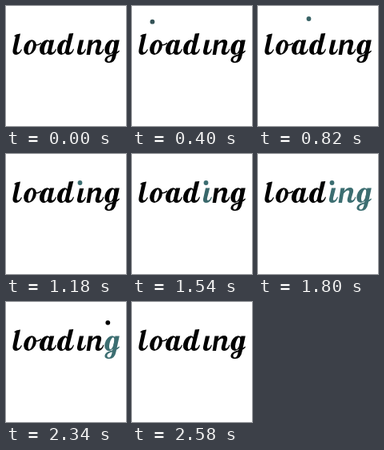
Write an HTML page that moves like this. It is 150 by 150 pixels and loops after 2640 ms.

```html
<!DOCTYPE html>
<html lang="en">
<head>
<meta charset="utf-8">
<title>loading</title>
<style>
html, body { margin: 0; width: 100%; height: 100%; overflow: hidden; background: #fff; }
svg { display: block; width: 100vw; height: 100vh; }
</style>
</head>
<body>
<svg viewBox="0 0 150 150" role="img" aria-label="loading">
  <g id="word"></g>
  <circle id="ball" r="2.9"/>
</svg>
<script>
const LOOP = 2640, STEP = 20, BASE = 61;
const BLACK = [0, 0, 0], TEAL = [60, 110, 113], SLATE = [50, 78, 82];
const NS = 'http://www.w3.org/2000/svg';
const word = document.getElementById('word');
const ball = document.getElementById('ball');

const clamp = v => Math.max(0, Math.min(1, v));
const ramp = (t, a, b) => clamp((t - a) / (b - a));
const mix = (a, b, u) => a + (b - a) * u;
const rgb = (a, b, u) => `rgb(${a.map((v, i) => Math.round(mix(v, b[i], u)))})`;

// Lettering parts, each returned as SVG markup
const shape = (d, dx = 0) => `<path d="${d}" transform="translate(${dx} 0)"/>`;
const line = (d, w) =>
  `<path d="${d}" fill="none" stroke="currentColor" stroke-width="${w}" stroke-linecap="round"/>`;
const oval = (x, y, rx, ry) =>
  `M${x - rx} ${y}a${rx} ${ry} 0 1 1 ${2 * rx} 0a${rx} ${ry} 0 1 1 ${-2 * rx} 0Z`;
const bowl = (cx, inner, rx = 7) =>
  `<path fill-rule="evenodd" transform="translate(${cx} 51.7) skewX(-13)" d="${
    oval(0, 0, rx, 9.4)}${oval(inner, 0, 2.7, 7.5)}"/>`;
const hook = dx => shape('M55 42.4H60.2L57 55Q56.4 58 58 58Q60.5 57.5 62 53.5L63 54Q61 61 56 61Q51.2 61 52 56Z', dx);

const glyphs = [
  shape('M10 37.4L13 35.4L18 34.5L13.6 54Q12.9 58 15 58Q17.5 57.5 19 54L20 54.5Q17.5 61 12.5 61Q7.4 61 8.6 54.5L12 38.6Z'),
  bowl(30, 0.8, 7.6) + line('M34 44.5Q35 49 38.5 48.8Q41.5 48.5 43.5 46.5', 1.5),
  bowl(49.3, 1.6) + hook(0),
  bowl(71.3, 1.6) + shape('M78.8 34.4L84.3 34L79 55Q78.4 58 80 58Q82.5 57.5 84 53.5L85 54Q83 61 78 61Q73.2 61 74 56Z'),
  hook(37),
  shape('M103.4 42.4H108.6L107.6 46.4Q111 42 115 42Q120 42 119 47.5L116.8 55Q116 58 117.6 58Q120 57.5 121.4 53.5L122.4 54Q120.5 61 115.6 61Q110.8 61 111.8 56L114 48Q114.6 45.4 112.8 45.4Q109.5 45.6 107 49.5L105 61H100.6Z'),
  bowl(130.6, 1.6) + shape('M136.4 42.4H141.8L137.6 62Q136 71 128.8 71Q123.4 71 123.4 67.2Q123.8 62.8 131 61Q137 59.5 141.3 55.5L142 56.4Q138.4 60.6 132 62.4Q126.4 64 126.4 67Q126.4 69.4 128.6 69.4Q131.4 69.2 132.4 64Z')
];

const letters = glyphs.map(markup => {
  const g = document.createElementNS(NS, 'g');
  g.innerHTML = markup;
  word.appendChild(g);
  return g;
});

// Contact points of the ball: time, x, y
const stops = [
  [15, 4, 16], [245, 14, 31], [475, 31, 39], [705, 49, 39], [935, 78, 31],
  [1165, 92.5, 36], [1920, 92.5, 36], [2150, 105, 39], [2380, 132, 39], [2580, 141, 16]
];
const hits = [245, 475, 705, 935, 1165, 2150, 2380];

function place(t) {
  let i = 0;
  while (i < stops.length - 2 && t >= stops[i + 1][0]) i++;
  const [t0, x0, y0] = stops[i], [t1, x1, y1] = stops[i + 1];
  const u = ramp(t, t0, t1);
  if (i === 0) return [mix(x0, x1, u), mix(y0, y1, u * u)];
  if (i === stops.length - 2) return [mix(x0, x1, u), mix(y1, y0, (1 - u) ** 2)];
  const rise = x0 === x1 ? 0 : (y0 + y1) / 2 - 16;
  return [mix(x0, x1, u), mix(y0, y1, u) - 4 * rise * u * (1 - u)];
}

// How teal each letter is
function tint(i, t) {
  if (i === 4) return ramp(t, 1200, 1560) - ramp(t, 1820, 1920);
  if (i > 4) return ramp(t, 1640, 1780) - ramp(t, hits[i], hits[i] + 120);
  return 0;
}

function draw(t) {
  letters.forEach((g, i) => {
    const u = ramp(t, hits[i], hits[i] + 100);
    const sy = 1 - 0.06 * Math.sin(Math.PI * u);
    const c = rgb(BLACK, TEAL, tint(i, t));
    g.setAttribute('fill', c);
    g.setAttribute('color', c);
    g.setAttribute('transform', `translate(0 ${BASE * (1 - sy)}) scale(1 ${sy})`);
  });
  const [x, y] = place(t);
  ball.setAttribute('cx', x);
  ball.setAttribute('cy', y);
  ball.setAttribute('fill', t < 1800
    ? rgb(SLATE, TEAL, ramp(t, 300, 1100))
    : rgb(TEAL, BLACK, ramp(t, 1820, 1920)));
  ball.setAttribute('opacity', ramp(t, 0, 120) * (1 - ramp(t, 2460, 2580)));
}

const start = performance.now();
function tick(now) {
  const t = Math.max(0, now - start) % LOOP;
  draw(Math.floor(t / STEP) * STEP);
  requestAnimationFrame(tick);
}
draw(0);
requestAnimationFrame(tick);
</script>
</body>
</html>
```
